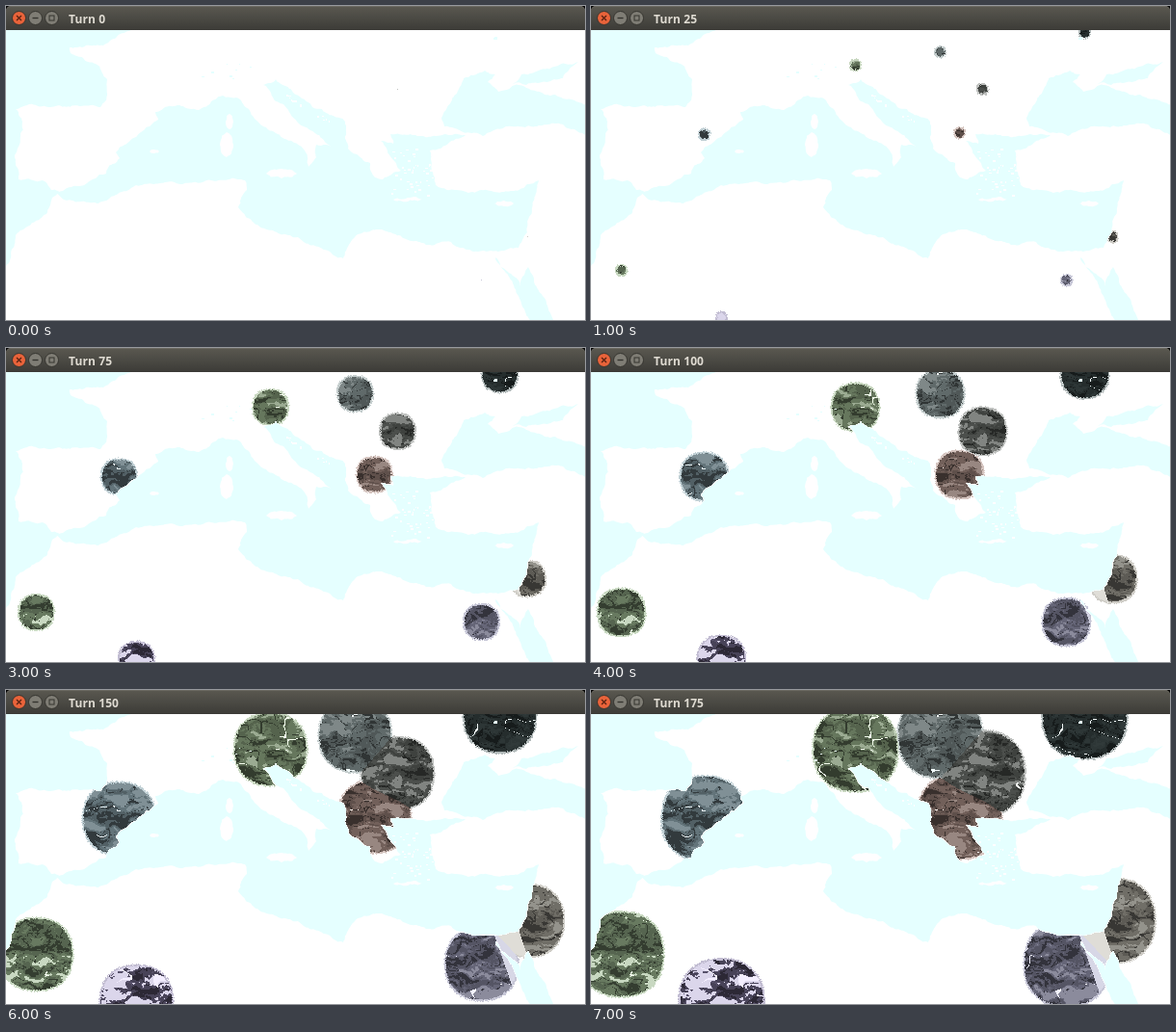
Write an HTML page with a canvas that moves like this. It is 601 px wide and 326 px high and loops after 8000 ms.

```html
<!DOCTYPE html>
<html lang="en">
<head>
<meta charset="utf-8">
<title>Turn</title>
<style>
  html, body { margin: 0; width: 100%; height: 100%; overflow: hidden; background: #fff; }
  canvas { position: absolute; left: 0; top: 0; display: block; }
  header {
    position: absolute; left: 0; top: 0; width: 601px; height: 25px; background: #000;
  }
  .bar {
    position: absolute; inset: 0; border-radius: 5px 5px 0 0;
    background: linear-gradient(#5a5850, #4b4a44 50%, #3c3b37);
    box-shadow: inset 0 1px #69675f;
  }
  h1 {
    position: absolute; left: 65px; top: 5px; margin: 0; white-space: pre;
    font: bold 12px/17px "Open Sans", sans-serif; letter-spacing: .1px; color: #dfdbd2;
  }
  svg { position: absolute; left: 0; top: 0; }
</style>
</head>
<body>
<canvas id="map" width="601" height="326"></canvas>
<header>
  <div class="bar"></div>
  <svg width="60" height="25" fill="none" stroke="#35342f">
    <circle cx="13.5" cy="12.5" r="7" fill="#e9633a"/>
    <path d="M11 10l5 5M16 10l-5 5" stroke="#5c2413" stroke-width="1.4"/>
    <circle cx="30.5" cy="12.5" r="7" fill="#7f7d75"/>
    <path d="M27.5 12.5h6" stroke-width="1.4"/>
    <circle cx="47.5" cy="12.5" r="7" fill="#7f7d75"/>
    <rect x="45" y="10" width="5" height="5"/>
  </svg>
  <h1 id="title">Turn 0</h1>
</header>
<script>
const W = 601, H = 326, TOP = 25;
const STEP = 1000, STEPS = 8, TURNS = 25, GROWTH = 0.258;
// Islands are a shade off white: growth does not cross the sea.
const SEA = '#e5ffff', LAND = '#fff', ISLAND = '#fffeff';
const ctx = document.getElementById('map').getContext('2d', { willReadFrequently: true });
const title = document.getElementById('title');

let seed = 7;
const rnd = () => (seed = (seed * 16807) % 2147483647) / 2147483647;
const mix = (a, b, k) => a + (b - a) * k;

// Splits a segment at displaced midpoints to get a ragged coast.
function coast(a, b) {
  const len = Math.hypot(b[0] - a[0], b[1] - a[1]);
  if (len < 3) return ctx.lineTo(...b);
  const m = a.map((v, i) => (v + b[i]) / 2 + (rnd() - 0.5) * Math.min(len * 0.25, 4));
  coast(a, m);
  coast(m, b);
}

function shape(pts, fill) {
  ctx.beginPath();
  pts.forEach((p, i) => coast(p, pts[(i + 1) % pts.length]));
  ctx.fillStyle = fill;
  ctx.fill();
}

function island(x, y, rx, ry) {
  const pts = Array.from({ length: 8 }, (_, i) => {
    const a = i * Math.PI / 4;
    return [x + rx * Math.cos(a), y + ry * Math.sin(a)];
  });
  shape(pts, ISLAND);
}

function specks(n, fill, x, y, w, h, slope = 0) {
  ctx.fillStyle = fill;
  for (let i = 0; i < n; i++) {
    const u = rnd() * w;
    ctx.fillRect(Math.round(x + u), Math.round(y + u * slope + rnd() * h), 1 + rnd() * 3 | 0, 1 + rnd() * 2 | 0);
  }
}

const seas = [
  // Atlantic
  `-9,20 134,20 101,41 66,43 67,49 93,60 105,76 103,99 98,105 24,102 10,107 17,120 9,155 13,180
   38,181 47,191 55,192 48,199 42,216 10,238 0,270 -9,270`,
  // Mediterranean
  `52,193 84,184 104,174 118,158 114,152 140,131 158,118 155,110 178,103 200,108 225,93 243,97
   258,117 280,132 310,150 314,167 322,157 322,144 342,148 305,123 283,100 267,82 280,76 318,105
   352,120 355,148 378,163 383,178 391,180 410,171 389,140 402,143 399,133 443,135 477,134 440,150
   446,186 480,194 524,192 553,181 541,235 532,251 515,254 480,253 462,245 445,248 415,242 390,232
   362,240 350,262 315,248 303,240 258,226 241,209 250,191 248,181 160,184 135,186 100,203 60,201`,
  // Black Sea, Sea of Azov, Red Sea
  '452,117 475,75 497,67 508,71 500,79 511,89 532,82 570,92 610,105 610,137 570,122 525,125 495,135 455,125',
  '526,81 535,71 594,58 578,75 540,82',
  '508,261 527,290 545,330 570,330 542,271 534,291'
].map(s => s.trim().split(/\s+/).map(p => p.split(',').map(Number)));

ctx.fillStyle = LAND;
ctx.fillRect(0, 0, W, H);
seas.forEach(s => shape(s, SEA));
island(286, 174, 16, 5);
island(229, 144, 7, 13);
island(232, 120, 4, 8);
island(154, 151, 5, 2);
island(417, 201, 15, 2);
island(517, 205, 10, 3);
specks(45, ISLAND, 400, 148, 42, 48);
specks(14, ISLAND, 288, 90, 48, 3, 0.6);
specks(8, SEA, 196, 52, 60, 24);
specks(5, SEA, 500, 29, 20, 2, 0.4);

// Colours move towards white, keeping some of their hue.
const tint = (rgb, k) => {
  const grey = (rgb[0] + rgb[1] + rgb[2]) / 3;
  return rgb.map(v => mix(v, 255, k) + (v - grey) * 0.8 * k);
};

// x, y, base colour, lightness of the bright terrain, height where it begins
const realms = [
  [31, 274, 0x687a60, 0.65, 0.66],
  [117, 133, 0x63747a, 0.2, 0.6],
  [274, 61, 0x66775d, 0.35, 0.64],
  [362, 47, 0x606a6a, 0.2, 0.64],
  [406, 86, 0x4c4f4c, 0.3, 0.6],
  [382, 131, 0x72605a, 0.25, 0.62],
  [512, 27, 0x2d3636, 0.02, 0.6],
  [541, 239, 0x706e67, 0.25, 0.66],
  [493, 284, 0x666678, 0.25, 0.58],
  [135, 323, 0x57516a, 0.8, 0.5]
].map(([x, y, hex, light, high]) => {
  const base = [hex >> 16, hex >> 8 & 255, hex & 255];
  const shades = [0.5, 0.83, 1].map(k => base.map(v => v * k));
  return {
    x, y, high, shades: [...shades, tint(base, light)],
    sand: tint(base, 0.76), halo: tint(base, 0.65), snow: tint(base, 0.95)
  };
});

const hash = (x, y) => {
  const s = Math.sin(x * 127.1 + y * 311.7) * 43758.5453;
  return s - Math.floor(s);
};
function noise(x, y) {
  const i = Math.floor(x), j = Math.floor(y);
  const u = (x - i) ** 2 * (3 - 2 * (x - i)), v = (y - j) ** 2 * (3 - 2 * (y - j));
  return mix(mix(hash(i, j), hash(i + 1, j), u), mix(hash(i, j + 1), hash(i + 1, j + 1), u), v);
}

function terrain(r, x, y) {
  // Sinai desert
  const east = x - (y - 250) * 0.35;
  if (y > 248 && east > 505 && east < 532) return r.sand;

  const wx = x + noise(x / 9, y / 9 + 40) * 12, wy = y + noise(x / 11 + 70, y / 11) * 10;
  const river = Math.abs(noise(wx / 34 + 9, wy / 15) - 0.5);
  if (river < 0.012 && noise(x / 20, y / 20 + 30) > 0.62) return r.snow;

  const n = noise(wx / 24, wy / 8) * 0.55 + noise(wx / 7, wy / 3) * 0.3 + noise(x / 2, y / 1.5) * 0.15;
  if (n > r.high) return r.shades[3];
  const ridge = Math.abs(noise(wx / 9, wy / 5 + 60) - 0.5);
  return r.shades[n < 0.34 || ridge < 0.025 ? 0 : n < 0.47 ? 1 : 2];
}

const distance = (r, x, y) => (Math.abs(x - r.x) ** 2.25 + Math.abs(y - r.y) ** 2.25) ** (1 / 2.25);

// Every reachable land cell belongs to its nearest realm.
const base = ctx.getImageData(0, 0, W, H);
const reach = STEPS * TURNS * GROWTH;
const cells = [];
for (let y = TOP; y < H; y++) {
  for (let x = 0; x < W; x++) {
    const at = (y * W + x) * 4;
    if (base.data[at] < 255 || base.data[at + 1] < 255) continue;
    let near = Infinity, owner;
    for (const r of realms) {
      const d = distance(r, x, y);
      if (d < near) { near = d; owner = r; }
    }
    if (near > reach) continue;
    const d = near + (hash(x, y) - 0.5) * 1.6;
    cells.push({ at, d, color: terrain(owner, x, y), halo: owner.halo });
  }
}

function paint(turn) {
  const radius = turn * GROWTH;
  const img = new ImageData(new Uint8ClampedArray(base.data), W, H);
  for (const c of cells) {
    if (c.d < radius) img.data.set(c.d > radius - 1.8 ? c.halo : c.color, c.at);
  }
  ctx.putImageData(img, 0, 0);
  title.textContent = 'Turn ' + turn;
}

let shown = -1;
const start = performance.now();
function tick() {
  const t = Math.max(0, performance.now() - start);
  const turn = Math.floor(t / STEP) % STEPS * TURNS;
  if (turn !== shown) paint(shown = turn);
  requestAnimationFrame(tick);
}
tick();
</script>
</body>
</html>
```
